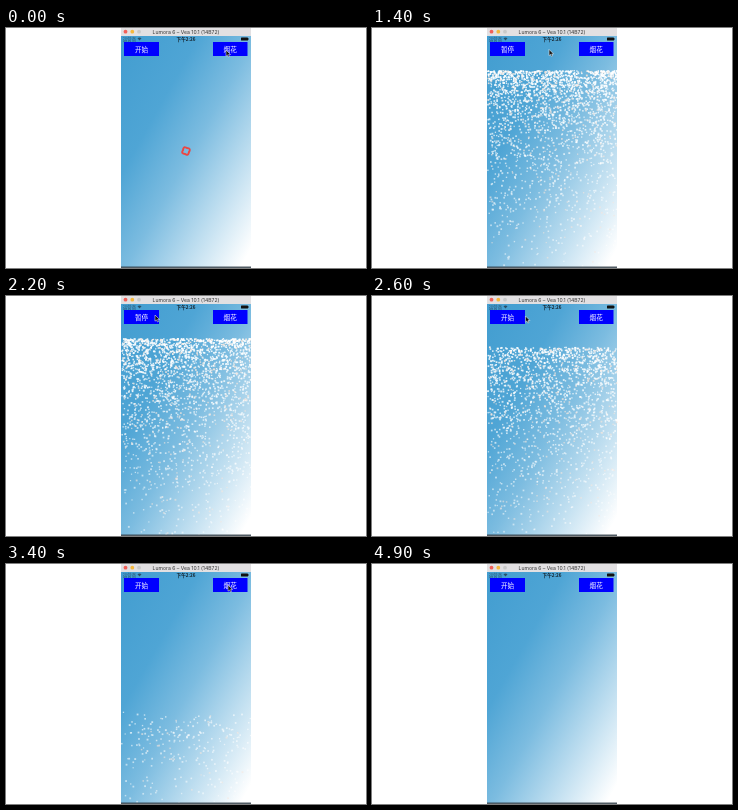
These frames come from a looping animation (360x240 px, 5 s). An HTML page with a canvas:

```html
<!DOCTYPE html>
<html lang="zh">
<head>
<meta charset="utf-8">
<style>
html, body { margin: 0; width: 100%; height: 100%; overflow: hidden; background: #fff; }
#screen {
  position: absolute; left: 115px; top: 8px; width: 130px; height: 231px;
  background: linear-gradient(to bottom right, #429dd0, #4fa5d5 30%, #7cbce0 52%, #fff 96%);
}
canvas, svg { position: absolute; left: 0; top: 0; }
text { font-family: "Noto Sans CJK SC", "Noto Sans CJK", "Noto Sans", sans-serif; text-anchor: middle; }
</style>
</head>
<body>
<div id="screen"></div>
<canvas id="sky" width="360" height="240"></canvas>
<svg width="360" height="240">
  <rect x="115" width="130" height="8" fill="#e2e0e2"/>
  <circle cx="119.5" cy="3.7" r="1.9" fill="#f26058"/>
  <circle cx="126.3" cy="3.7" r="1.9" fill="#f5b83c"/>
  <circle cx="133" cy="3.7" r="1.9" fill="#c9c9c9"/>
  <text x="180" y="5.6" font-size="5.1" fill="#333" style="font-family:Inter,sans-serif">Lumora 6 – Vea 10.1 (14B72)</text>
  <rect x="115" y="238.6" width="130" height="1.2" fill="#26333d"/>
  <text x="123.5" y="12.8" font-size="4.3" fill="#28506a">运营商</text>
  <path d="M131.5 10.3q2-1.8 4 0l-2 2.3z" fill="#28506a"/>
  <text x="180" y="12.9" font-size="4.6" font-weight="bold" fill="#14222c">下午2:26</text>
  <rect x="235" y="9.4" width="7" height="3.2" rx=".6" fill="#111"/>
  <rect x="242.2" y="10.4" width=".7" height="1.2" fill="#111"/>
  <g fill="#00f">
    <rect x="118" y="14" width="35" height="14"/>
    <rect x="207" y="14" width="34.5" height="14"/>
  </g>
  <g font-size="6.6" fill="#fff">
    <text id="toggle" x="135.5" y="23.5">开始</text>
    <text x="224.2" y="23.5">烟花</text>
  </g>
  <path id="cursor" d="M0 0V6.2L1.5 4.9L2.5 7L3.5 6.5L2.6 4.5H4.5Z" fill="#111" stroke="#fff" stroke-width=".5"/>
</svg>
<script>
const LOOP = 5000, STEP = 100, SNOW_ON = 500, SNOW_OFF = 2400, LIFE = 1.5;
const ctx = document.getElementById('sky').getContext('2d');
const toggle = document.getElementById('toggle');
const cursor = document.getElementById('cursor');

let seed = 7;
const rnd = () => (seed = (seed * 16807) % 2147483647) / 2147483647;

const flakes = Array.from({ length: 3300 }, () => ({
  x: 115 + rnd() * 130, phase: rnd() * LIFE, life: 0.6 + rnd() * 0.9,
  speed: 1 + rnd() * 0.2, drift: (rnd() - 0.5) * 8, size: 1.2 + rnd() * 0.7,
  color: rnd() < 0.12 ? '#f8e6dc' : '#fff'
}));

// Click times of the firework button; each burst lasts half a second.
const bursts = [-100, 1600, 3800];

// Pointer path: time, x, y
const path = [
  [0, 220, 22], [100, 220, 22], [450, 143, 23], [900, 143, 24], [1250, 144, 23],
  [1600, 228, 19], [1800, 228, 19], [2200, 149, 19], [2500, 147, 20],
  [3000, 209, 20], [3300, 222, 21], [4100, 223, 22], [4800, 223, 22]
];

function pointer(t) {
  const i = path.findIndex(k => k[0] > t);
  if (i < 0) return null;
  const [t0, x0, y0] = path[i - 1], [t1, x1, y1] = path[i];
  const p = (t - t0) / (t1 - t0), e = p * p * (3 - 2 * p);
  return [x0 + (x1 - x0) * e, y0 + (y1 - y0) * e];
}

function drawSnow(t) {
  if (t < SNOW_ON) return;
  for (const f of flakes) {
    const age = (t / 1000 - f.phase + LIFE * 2) % LIFE;
    if (age > f.life || t - age * 1000 > SNOW_OFF) continue;
    const y = 42 + (25 * age + 78 * age * age) * f.speed;
    const x = f.x + f.drift * age;
    if (y > 238 || x < 115 || x > 244) continue;
    ctx.globalAlpha = 0.92 - age * 0.3;
    ctx.fillStyle = f.color;
    ctx.fillRect(x, y, f.size, f.size);
  }
}

function drawBurst(age) {
  if (age < 0 || age >= 500) return;
  const r = 1.4 + age * 0.022, dot = 1.45 - age * 0.0018;
  ctx.globalAlpha = 1 - age / 1200;
  ctx.fillStyle = '#f0443e';
  for (let i = 0; i < 26; i++) {
    const a = i * Math.PI / 13, d = r + Math.sin(i * 5.3) * 0.5;
    ctx.beginPath();
    ctx.arc(180 + d * Math.cos(a), 123 + d * Math.sin(a), dot * 0.75, 0, 7);
    ctx.fill();
  }
}

function frame(now) {
  const t = Math.floor(now % LOOP / STEP) * STEP;
  ctx.clearRect(0, 0, 360, 240);
  drawSnow(t);
  bursts.forEach(b => drawBurst(t - b));
  toggle.textContent = t >= SNOW_ON && t < SNOW_OFF ? '暂停' : '开始';
  const p = pointer(t);
  cursor.setAttribute('visibility', p ? 'visible' : 'hidden');
  if (p) cursor.setAttribute('transform', `translate(${p})`);
}

let start;
function tick(now) {
  start ??= now;
  frame(now - start);
  requestAnimationFrame(tick);
}
frame(0);
requestAnimationFrame(tick);
</script>
</body>
</html>
```
